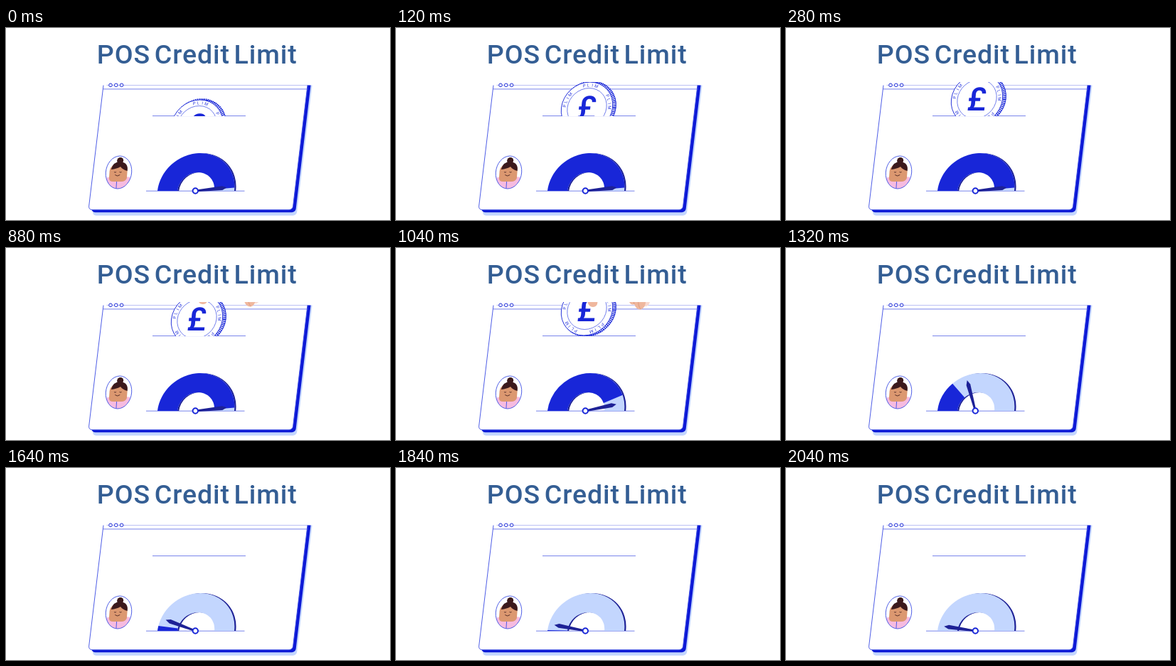
Animation, 540 px wide and 270 px high, one loop 2.96 s. Source, as an HTML page:

```html
<!DOCTYPE html>
<html lang="en">
<head>
<meta charset="utf-8">
<title>POS Credit Limit</title>
<style>
  html, body { margin: 0; width: 100%; height: 100%; overflow: hidden; background: #fff; }
  svg { display: block; width: 100vw; height: 100vh; }
  .line { fill: none; stroke: #4051e4; stroke-width: .9; }
  .soft { opacity: .8; }
  .blue { fill: #1826d8; }
  .edge { fill: #0c19d6; }
  .pale { fill: #c3d6fe; }
  .navy { fill: #1d2196; }
  .skin { fill: #efb79d; }
  text { font-family: Roboto, Inter, sans-serif; }
  #coin text { text-anchor: middle; }
</style>
</head>
<body>
<svg viewBox="0 0 540 270">
  <defs>
    <clipPath id="panelClip"><rect y="80.500" width="540" height="190"/></clipPath>
    <clipPath id="slot"><rect x="120" y="76" width="310" height="48"/></clipPath>
    <clipPath id="portrait"><ellipse rx="18.2" ry="23"/></clipPath>
    <rect id="panel" x="116" y="-205" width="287" height="205" rx="5"/>
  </defs>

  <text x="127.800" y="50" font-size="37.500" font-weight="500" letter-spacing=".9"
        word-spacing="-4.500" fill="#345e94">POS Credit Limit</text>

  <!-- window -->
  <g clip-path="url(#panelClip)">
    <g transform="translate(0 255.7) skewX(-6.84)">
      <use href="#panel" class="pale" x="6.500" y="8"/>
      <use href="#panel" class="edge" x="4.500" y="3.600"/>
      <use href="#panel" fill="#fff" stroke="#4051e4" stroke-width=".9"/>
    </g>
  </g>
  <path class="line soft" d="M137 85.9H425M206 123.6H337M197 229.2H335.500"/>
  <g fill="#fff" stroke="#1826d8">
    <circle cx="147" cy="80.300" r="2.300"/>
    <circle cx="154.800" cy="80.300" r="2.300"/>
    <circle cx="162.600" cy="80.300" r="2.300"/>
  </g>

  <!-- customer -->
  <g transform="translate(158.5 203) skewX(-4)">
    <ellipse rx="18.2" ry="23" fill="#fff"/>
    <g clip-path="url(#portrait)">
      <path fill="#f6bbe0" d="M-20 24V9Q-14 6 -7 6H8Q16 6 20 9V24Z"/>
      <path fill="#dc9870" d="M-13-2Q-12-12 0-12T12-3V8Q11 13 4 13H-7Q-13 13 -13 8Z"/>
      <path fill="#3b191c" d="M-11-4Q-9-15 1-15Q13-14 12-2Q5-4 2-8Q-3-5-11-4Z"/>
      <circle cx="1" cy="-16.500" r="4.500" fill="#3b191c"/>
      <path fill="none" stroke="#3b191c" stroke-width=".8"
            d="M-6.500-.5q1.500 1.200 3 0M1-.5q1.500 1.200 3 0M-5 3.500q3.500 3 7 0"/>
      <path class="line" d="M-2 13V24"/>
    </g>
    <ellipse class="line" rx="18.2" ry="23"/>
  </g>

  <!-- gauge -->
  <g transform="translate(267 229) skewX(-6.84)">
    <path id="rim" class="navy" transform="translate(2.200 0)"/>
    <path id="track" class="pale"/>
    <path id="fill" class="blue"/>
  </g>
  <g transform="translate(266.3 229)">
    <path id="needle" class="navy" d="M0-1.300L38-2.900L44.500 0L38 2.900L0 1.300Z"/>
    <circle r="3.700" fill="#fff" stroke="#1826d8" stroke-width="2"/>
  </g>

  <!-- coin and hand -->
  <g clip-path="url(#slot)">
    <g id="coin">
      <g transform="skewX(-6.84)">
        <circle cx="4.700" r="36" fill="#fff" stroke="#1826d8" stroke-width=".9"/>
        <circle cx="2.600" r="36" fill="none" stroke="#1826d8" stroke-width="4.200" stroke-dasharray="1.300 1.200"/>
        <circle r="36" fill="#fff" stroke="#1826d8" stroke-width=".9"/>
        <circle class="line soft" r="27.500"/>
        <g id="legend" font-size="6" fill="#2c3ade"></g>
        <text y="15.500" font-size="45.500" font-weight="500" fill="#1826d8">£</text>
      </g>
    </g>
    <g id="hand">
      <path class="skin" d="M270-30L269.500-11Q271-4 277-4T283.500-11L292-60H272Z"/>
      <path fill="#f8d9d0" d="M346-60V-10Q349-3 354-6Q358-9 357-16L362-60Z"/>
      <path class="skin" d="M326-60L328-11Q331-6 335-8Q338 0 344-.5Q350-2 351-10L354-60Z"/>
      <path fill="none" stroke="#d99478" stroke-width=".8" d="M335-8L333-18M344-1Q340-6 341-14"/>
    </g>
  </g>
</svg>
<script>
const LOOP = 2960, STEP = 40, SWEEP_START = 880, SWEEP_TIME = 1160;
const $ = id => document.getElementById(id);
const clamp = v => Math.min(1, Math.max(0, v));

// Cubic bezier easing (.45, 0, .1, 1)
function ease(x) {
  let lo = 0, hi = 1;
  for (let i = 0; i < 24; i++) {
    const s = (lo + hi) / 2, r = 1 - s;
    if (1.35 * s * r * r + .3 * s * s * r + s ** 3 < x) lo = s; else hi = s;
  }
  return lo * lo * (3 - 2 * lo);
}

// Ring segment from the given angle to the left end of the gauge
function band(deg) {
  const a = deg * Math.PI / 180, c = Math.cos(a), s = -Math.sin(a);
  return `M${54 * c} ${53 * s}A54 53 0 0 0 -54 0H-26A26 26 0 0 1 ${26 * c} ${26 * s}Z`;
}

function sweep(t, lead) {
  return t <= SWEEP_START ? 0 : ease(clamp((t + lead - SWEEP_START) / SWEEP_TIME));
}

function coinY(t) {
  if (t < 960) return 100 + 37 * (1 - clamp(t / 280)) ** 2;
  return 100 - 13 * ((t - 960) / 80) ** 2;
}

function handY(t) {
  if (t < SWEEP_START) return 0;
  return t < 960 ? 100 - 17 * ((960 - t) / 80) ** 2 : coinY(t);
}

function draw(t) {
  $("coin").setAttribute("transform", `translate(268.5 ${coinY(t)})`);
  $("hand").setAttribute("transform", `translate(0 ${handY(t)})`);
  $("needle").setAttribute("transform", `rotate(${-6 - 166 * sweep(t, -15)})`);
  $("fill").setAttribute("d", band(5 + 175 * sweep(t, 68)));
}

let letters = "";
for (let word = 0; word < 5; word++)
  [..."PLIM"].forEach((ch, i) => {
    letters += `<text y="-29.700" transform="rotate(${2 + word * 72 + (i - 1.5) * 10.5})">${ch}</text>`;
  });
$("legend").innerHTML = letters;
$("rim").setAttribute("d", band(0));
$("track").setAttribute("d", band(0));

const start = performance.now();
function tick() {
  const t = (performance.now() - start) % LOOP;
  draw(Math.floor(t / STEP) * STEP);
  requestAnimationFrame(tick);
}
tick();
</script>
</body>
</html>
```
